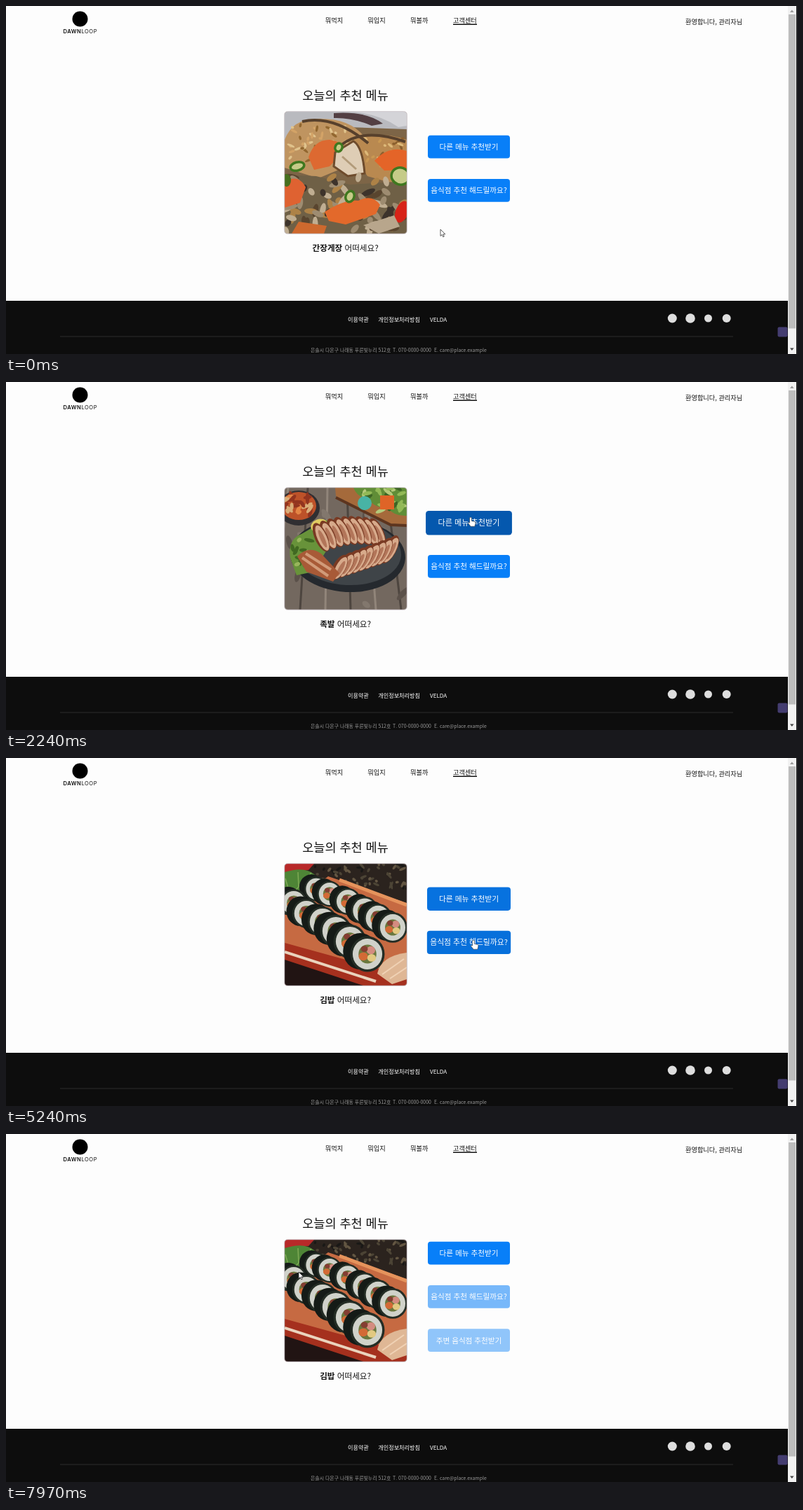
An HTML page that plays this animation: 1127 by 497 pixels, repeating every 8000 ms.

```html
<!DOCTYPE html>
<html lang="ko">
<head>
<meta charset="utf-8">
<title>오늘의 추천 메뉴</title>
<style>
html, body { margin: 0; width: 100%; height: 100%; overflow: hidden; background: #fdfdfd; }
svg { display: block; width: 100vw; height: 100vh; }
text { font-family: "Noto Sans CJK KR", "Noto Sans CJK", "Noto Sans", sans-serif; fill: #111; }
.mid { text-anchor: middle; }
.nav { font-size: 9.2px; font-weight: 500; }
.btn text { font-size: 10.6px; font-weight: 500; fill: #fff; }
.links text { font-size: 8.1px; font-weight: 500; fill: #fff; }
.info text { font-size: 6.9px; fill: #999; }
.brand { font: 600 7.6px Inter, sans-serif; letter-spacing: .55px; }
</style>
</head>
<body>
<svg viewBox="0 0 1127 497">
  <defs><clipPath id="clip"><rect width="174" height="174" rx="4"/></clipPath></defs>
  <rect width="1127" height="497" fill="#fdfdfd"/>
  <circle cx="105.5" cy="18.5" r="11"/>
  <text x="105.8" y="39.3" class="brand mid">DAWN<tspan font-weight="400">LOOP</tspan></text>
  <g class="nav">
    <text x="454.8" y="23.6">뭐먹지</text>
    <text x="515.3" y="23.6">뭐입지</text>
    <text x="576" y="23.6">뭐볼까</text>
    <text x="637" y="23.6">고객센터</text>
    <text x="968" y="26.4">환영합니다, 관리자님</text>
  </g>
  <path d="M637 26.2h34" stroke="#111" stroke-width="1.4"/>
  <text x="483.5" y="133.6" class="mid" font-size="17.5" font-weight="500">오늘의 추천 메뉴</text>

  <g transform="translate(397 151)">
    <g id="photos" clip-path="url(#clip)"></g>
    <rect x="-.3" y="-.3" width="174.6" height="174.6" rx="4.5" fill="none" stroke="#cbc4c8"/>
  </g>
  <text x="483.6" y="349.6" class="mid" font-size="11.6"><tspan id="menu" font-weight="700"></tspan> 어떠세요?</text>

  <g id="buttons"></g>

  <rect y="421" width="1114" height="76" fill="#0d0d0d"/>
  <g class="links">
    <text x="487" y="451.3">이용약관</text>
    <text x="530.3" y="451.3">개인정보처리방침</text>
    <text x="604" y="451.3">VELDA</text>
  </g>
  <path d="M77 472h959" stroke="#2c2c2c"/>
  <g class="info">
    <text x="434" y="494.2">은솔시 다온구 나래동 푸른빛누리 512호</text>
    <text x="551" y="494.2">T. 070-0000-0000</text>
    <text x="610" y="494.2">E. care@place.example</text>
  </g>
  <g fill="#dedede">
    <circle cx="949.3" cy="446" r="6.5"/><circle cx="975" cy="446" r="6.8"/>
    <circle cx="1000.5" cy="446" r="5.5"/><circle cx="1026.7" cy="446" r="6"/>
  </g>
  <rect x="1099.5" y="458.5" width="14" height="14" rx="2" fill="#443d70"/>

  <rect x="1114" width="12" height="497" fill="#f1f1f1"/>
  <rect x="1115" y="12" width="10" height="448.5" fill="#bdbdbd"/>
  <path d="M1117 9l2.8-3.5 2.8 3.5z" fill="#999"/>
  <path d="M1117 488.5l2.8 3.5 2.8-3.5z" fill="#444"/>
  <rect x="1126" width="1" height="497" fill="#111"/>

  <g id="arrow"><path d="M0 0v9.5l2.2-2 1.5 3.3 1.6-.7-1.5-3.2h3z" fill="#fff" stroke="#333" stroke-width=".8"/></g>
  <g id="hand"><path d="M-1.4 1q1.4-2 2.8 0v4.4l4.4 1q1.5.5 1.1 2.4l-1 4.4h-5.9l-3.6-4.7q0-1.7 2.2-.4z" fill="#fff" stroke="#333" stroke-width=".6"/></g>
</svg>
<script>
const $ = id => document.getElementById(id);
const oval = (x, y, rx, ry, fill, turn = 0, extra = '') =>
  `<ellipse cx="${x}" cy="${y}" rx="${rx}" ry="${ry}" fill="${fill}" transform="rotate(${turn} ${x} ${y})" ${extra}/>`;
const shape = (d, fill, extra = '') => `<path d="${d}" fill="${fill}" ${extra}/>`;
const line = (d, color, width) => shape(d, 'none', `stroke="${color}" stroke-width="${width}"`);
const fillAll = color => shape('M0 0h174v174H0z', color);

let seed = 7;
const random = () => (seed = seed * 16807 % 2147483647) / 2147483647;
const specks = (n, x, y, w, h, colors, size) => Array.from({ length: n }, () =>
  oval(x + random() * w, y + random() * h, size * (.5 + random()), size * .45,
    colors[random() * colors.length | 0], random() * 180)).join('');

function crab() {
  const chili = (x, y, rx, ry, turn) => oval(x, y, rx, ry, '#c5cb88', turn, 'stroke="#3f781f" stroke-width="3.5"');
  return fillAll('#7d6547')
    + shape('M0 0H174V25L90 22 0 48z', '#b9babf')
    + shape('M92 0q42 2 70 22l12-2V0z', '#d4d4d8')
    + shape('M70 2q48-3 70 15l-16 3Q96 8 70 9z', '#533f43')
    + shape('M0 40Q12 8 50 10q48 0 66 30l-20 35-48 20L0 80z', '#bf9460')
    + shape('M88 48Q120 22 174 40V108L118 92z', '#b98950')
    + specks(50, 8, 15, 85, 55, ['#e0c38c', '#92672f', '#d3a367'], 4)
    + specks(30, 115, 38, 58, 45, ['#ddb878', '#8c602e', '#c99853'], 4)
    + line('M25 14Q70 4 119 45M80 48Q112 22 172 43', '#57402c', 4)
    + shape('M34 65q8-25 30-25 19 3 22 15L64 78 42 83z', '#dd6931')
    + shape('M128 70q20-22 46-14v27l-32 1z', '#e46428')
    + shape('M72 58L98 42q13 8 16 46L90 92 70 78z', '#decdb5', 'stroke="#6e4c2d" stroke-width="3"')
    + line('M82 64l20 18', '#b29b7a', 3)
    + shape('M0 90l45 2 48 12 81-5V174H0z', '#6f6046')
    + specks(75, 0, 93, 172, 78, ['#9e8c71', '#3d332b', '#ad8247', '#c0ae92', '#59452f'], 9)
    + shape('M0 100q20-12 30 8l-8 22-22 7z', '#df6231')
    + shape('M57 143q28-18 48-16 20-10 31 6l-6 13-43 15-24-5z', '#e3692b')
    + oval(167, 143, 9, 16, '#d72318', 20) + shape('M20 157l40 6-4 11H10z', '#ce692e')
    + shape('M112 162l44-14 8 16-30 10z', '#b8a68c')
    + chili(18, 78, 10, 6, -15) + chili(77, 51, 5, 6, 20)
    + chili(165, 92, 13, 12, 20) + chili(93, 121, 6, 8, 20) + oval(3, 98, 6, 9, '#47701e');
}

function pork() {
  let art = fillAll('#73685f');
  for (let i = 0; i < 6; i++) art += line(`M${i * 36 - 14} 174L${i * 28 + 5} 0`, i % 2 ? '#4d453f' : '#91857a', 3);
  art += specks(30, 0, 5, 174, 165, ['#82776d', '#5b514a'], 9)
    + shape('M72 0H174V55L151 52 73 12z', '#a56a3b') + line('M73 14l78 39 23 1', '#5d351f', 4)
    + shape('M98 0H174V40q-18 1-27-11-20 0-28-14-15 0-21-15z', '#608d37')
    + specks(22, 112, 0, 60, 34, ['#92b957', '#3d6525', '#b4c97a'], 6)
    + oval(20, 29, 30, 25, '#302f32') + oval(20, 26, 25, 20, '#bd5229')
    + specks(24, 0, 11, 38, 27, ['#e48545', '#92341f', '#d9ad78'], 6)
    + oval(90, 97, 82, 52, '#25292e', 3) + oval(90, 93, 76, 46, '#3f4448', 3)
    + shape('M8 100Q4 74 24 66l35-20 20 12-38 62-24 5z', '#68933a')
    + specks(12, 10, 65, 28, 45, ['#98b65c', '#416922'], 6)
    + oval(49, 54, 12, 9, '#e1cd62', -20);
  const slice = (x, y, rx, ry, turn) => oval(x, y, rx, ry, '#793a23', turn)
    + oval(x + 1.5, y + 1, rx * .74, ry * .88, '#d7aa8b', turn) + oval(x + 2, y + 2, rx * .35, ry * .62, '#b27559', turn);
  for (let i = 0; i < 9; i++) art += slice(132 - i * 10, 64 - Math.sin(i / 2.7) * 7 + i, 9, 22, -24);
  for (let i = 0; i < 9; i++) art += slice(150 - i * 9, 88 + i * 3.2, 9, 22 - i * .3, 28);
  return art + shape('M18 98q16-16 34-4l26 28-9 12-38-14z', '#a85a37')
    + line('M25 100l37 26M30 94l36 23', '#d19b79', 4)
    + oval(114, 22, 10, 10, '#48b3a5') + shape('M136 11h20v20h-20z', '#df6427');
}

function rolls() {
  const roll = (x, y, r) => oval(x - r * .42, y - r * .16, r, r * 1.06, '#151b17')
    + oval(x, y, r, r * 1.04, '#242d25') + oval(x, y, r * .86, r * .9, '#d0d2ca')
    + oval(x, y, r * .52, r * .55, '#6a783d')
    + oval(x - r * .24, y + r * .14, r * .27, r * .24, '#d36a35')
    + oval(x + r * .2, y - r * .22, r * .25, r * .24, '#d48c80')
    + oval(x + r * .24, y + r * .22, r * .25, r * .22, '#e2c981')
    + oval(x - r * .18, y - r * .3, r * .2, r * .18, '#843e32');
  const back = [[45, 36], [64, 43], [90, 54], [114, 67], [133, 78], [154, 91]];
  const front = [[13, 56], [31, 71], [54, 83], [73, 96], [93, 111], [118, 129]];
  return fillAll('#2b231e')
    + specks(55, 30, 0, 144, 35, ['#4c4435', '#191816', '#635642'], 4)
    + shape('M0 0h42l-8 9-34 3z', '#b82929')
    + shape('M0 12q28-9 42 3l14 15L0 72z', '#4e8536') + line('M0 55L38 13M8 45l-7-24M20 33l-1-21', '#7eaa55', 1.5)
    + shape('M62 18l112 38v118L0 126V65z', '#c66a42')
    + line('M78 23l96 36', '#e5935c', 5)
    + shape('M0 113l174 48v13H0z', '#a5301e') + line('M0 126l130 42', '#ead3bd', 4)
    + shape('M0 137l112 37H0z', '#211413')
    + shape('M132 157q5-25 42-30v38l-21 7z', '#dfb795') + line('M139 158l31-22M150 164l24-16', '#f0d2b5', 2)
    + back.map(([x, y], i) => roll(x, y, 17 + i * .8)).join('')
    + front.map(([x, y], i) => roll(x, y, 19 + i * 1.1)).join('');
}

const menus = [[0, '간장게장', crab], [2240, '족발', pork], [4470, '김밥', rolls]];
$('photos').innerHTML = menus.map(m => `<g>${m[2]()}</g>`).join('');
const photos = [...$('photos').children];

const labels = ['다른 메뉴 추천받기', '음식점 추천 해드릴까요?', '주변 음식점 추천받기'];
$('buttons').innerHTML = labels.map(label => `<g class="btn">
  <rect x="-58.5" y="-16.4" width="117" height="32.8" rx="4"/><text y="3.9" class="mid">${label}</text></g>`).join('');
const buttons = [...$('buttons').children];

const clamp = p => Math.max(0, Math.min(1, p));
const ease = p => 1 - (1 - clamp(p)) ** 2;
const mix = (a, b, p) => a + (b - a) * p;
const blue = [8, 127, 248], navy = [5, 88, 174];
const SPLIT = 7740, FADE = 300;
// Enter and leave times of the pointer, per button
const hovers = [[[400, 5115]], [[180, 290], [5175, 6530]], []];

function pointer(t) {
  if (t >= SPLIT) return [417, 197];
  if (t < 5000) {
    const p = clamp((t - 40) / 440);
    return [mix(619, 662, p), mix(319, 193, p)];
  }
  const p = clamp((t - 5000) / 200);
  return [mix(662, 666, p), mix(193, 260, p)];
}

function draw(t) {
  const current = menus.findLastIndex(m => t >= m[0]);
  photos.forEach((g, i) => g.style.display = i === current ? '' : 'none');
  $('menu').textContent = menus[current][1];

  const split = t >= SPLIT, fade = clamp((t - SPLIT) / 230);
  const opacity = [1, mix(1, .54, fade), .44 * fade];
  buttons.forEach((g, i) => {
    const hover = hovers[i].reduce((sum, [enter, leave]) =>
      sum + ease((t - enter) / FADE) - ease((t - leave) / FADE), 0);
    const y = (split ? 170.2 : 201.2) + i * 62.2;
    g.setAttribute('transform', `translate(659.5 ${y}) scale(${1 + .05 * hover})`);
    g.setAttribute('opacity', opacity[i]);
    g.firstElementChild.setAttribute('fill', `rgb(${blue.map((c, k) => mix(c, navy[k], hover))})`);
  });

  const [x, y] = pointer(t);
  const over = !split && (y > 184 && y < 218 || y > 247 && y < 280);
  for (const id of ['arrow', 'hand']) {
    $(id).setAttribute('transform', `translate(${x} ${y})`);
    $(id).style.display = over === (id === 'hand') ? '' : 'none';
  }
}

const start = performance.now();
(function tick() {
  draw((performance.now() - start) % 8000);
  requestAnimationFrame(tick);
})();
</script>
</body>
</html>
```
